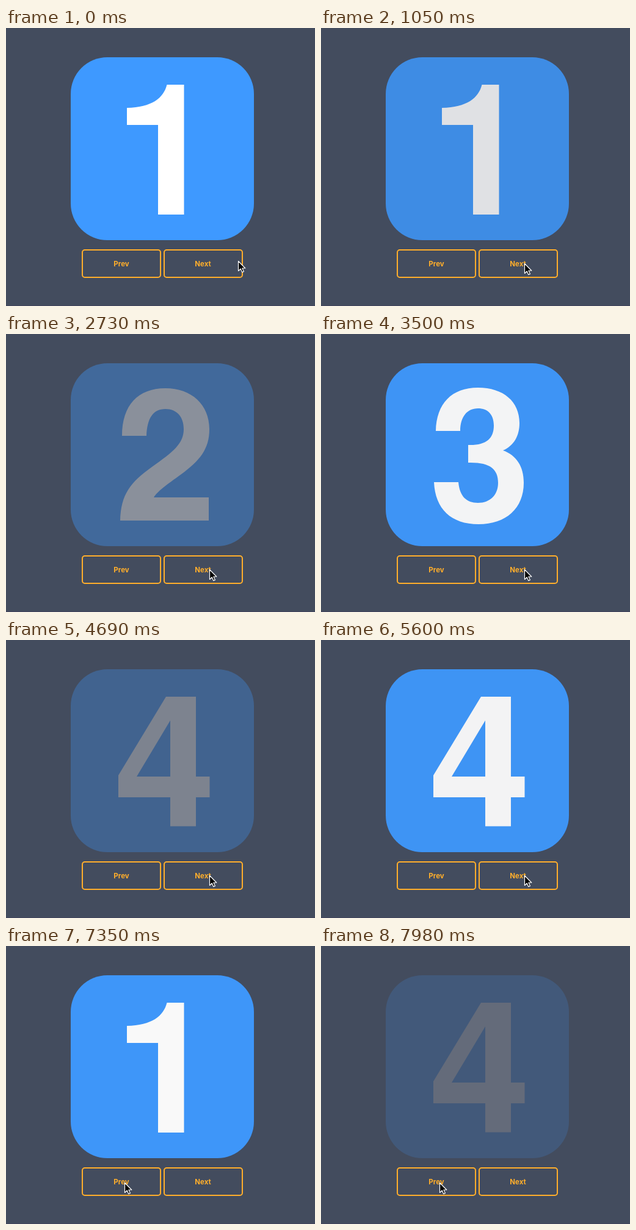
Animation of 506 by 456 pixels, one loop 8 s. Source, as an HTML page:

```html
<!DOCTYPE html>
<html lang="en">
<head>
<meta charset="utf-8">
<title>Fading number switcher</title>
<style>
  html, body { margin: 0; width: 100%; height: 100%; overflow: hidden; background: #434c5e; }
  svg { display: block; width: 506px; height: 456px; }
  .button rect { fill: none; stroke: #ffae2b; stroke-width: 2; }
  .button text { fill: #ffae2b; font: 700 11.5px Inter, sans-serif; text-anchor: middle; }
</style>
</head>
<body>
<svg viewBox="0 0 506 456">
  <rect width="506" height="456" fill="#434c5e"/>
  <rect y="455" width="506" height="1" fill="#41435c"/>
  <g id="card" role="img">
    <rect x="106" y="48" width="300" height="300" rx="60" fill="#3e99ff"/>
    <path id="digit" fill="#fff" fill-rule="evenodd"/>
  </g>
  <g class="button">
    <rect x="125" y="364" width="128" height="45" rx="4"/>
    <text x="189" y="391">Prev</text>
  </g>
  <g class="button">
    <rect x="259" y="364" width="128" height="45" rx="4"/>
    <text x="322.5" y="391">Next</text>
  </g>
  <path id="cursor" d="M.5 .5V16.5L4.2 13L6.7 18.6L9.4 17.4L6.9 12H11.8Z"
        fill="#000" stroke="#fff" stroke-width="1.2" stroke-linejoin="round"/>
</svg>
<script>
const LOOP = 8000, STEP = 70, FADE = 575;

const digits = {
  1: 'M291.5 93V306H249V159H198V131C239 130 258 115 263.5 93Z',
  2: 'M190 167C190 117 216 89 261 89C304 89 333 116 333 156C333 189 317 208 287 230' +
     'C262 248 248 258 242 268H332V306H187C188 263 204 243 239 218C274 193 291 180 291 156' +
     'C291 136 280 123 261 123C241 123 231 138 230 167Z',
  3: 'M188 159C189 114 214 88 257 88C299 88 325 111 325 146C325 167 316 183 298 191' +
     'C320 199 332 217 332 244C332 286 303 312 258 312C213 312 187 287 185 243H225' +
     'C227 266 238 277 257 277C277 277 290 264 290 244C290 221 276 210 241 211V182' +
     'C270 183 283 172 283 150C283 132 273 122 257 122C239 122 228 136 228 159Z',
  4: 'M262 93H311V224H333.5V258H311V305.5H269V258H184V222ZM269 132L214 224H269Z'
};

// [click time, digit shown afterwards]
const clicks = [[-2000, 1], [970, 2], [2523, 3], [3997, 4], [5556, 1], [7322, 4]];
// [time, x, y]
const cursorPath = [[0, 380, 382], [280, 333, 386], [6300, 333, 386],
                    [6370, 329, 386], [7140, 194, 388], [LOOP, 194, 388]];

const card = document.getElementById('card');
const digit = document.getElementById('digit');
const cursor = document.getElementById('cursor');
const clamp = v => Math.min(1, Math.max(0, v));

// CSS "ease": cubic-bezier(.25, .1, .25, 1)
function ease(x) {
  const bezier = (s, a, b) => 3 * s * (1 - s) * (1 - s) * a + 3 * s * s * (1 - s) * b + s ** 3;
  let low = 0, high = 1;
  for (let i = 0; i < 20; i++) {
    const mid = (low + high) / 2;
    if (bezier(mid, .25, .25) < x) low = mid; else high = mid;
  }
  return bezier(low, .1, 1);
}

function cardAt(t) {
  const i = clicks.findLastIndex(([start]) => start <= t);
  const elapsed = t - clicks[i][0];
  return elapsed < FADE
    ? { value: clicks[i - 1][1], opacity: 1 - ease(elapsed / FADE) }
    : { value: clicks[i][1], opacity: ease(clamp((elapsed - FADE) / FADE)) };
}

function cursorAt(t) {
  const i = cursorPath.findIndex(([end]) => end > t);
  const [t0, x0, y0] = cursorPath[i - 1], [t1, x1, y1] = cursorPath[i];
  const p = (t - t0) / (t1 - t0);
  return [x0 + (x1 - x0) * p, y0 + (y1 - y0) * p];
}

function draw(now) {
  const t = Math.floor((now % LOOP) / STEP) * STEP;
  const { value, opacity } = cardAt(t);
  digit.setAttribute('d', digits[value]);
  card.setAttribute('aria-label', value);
  card.setAttribute('opacity', opacity);
  cursor.setAttribute('transform', `translate(${cursorAt(t)})`);
}

let start;
function tick(now) {
  start ??= now;
  draw(now - start);
  requestAnimationFrame(tick);
}
draw(0);
requestAnimationFrame(tick);
</script>
</body>
</html>
```
